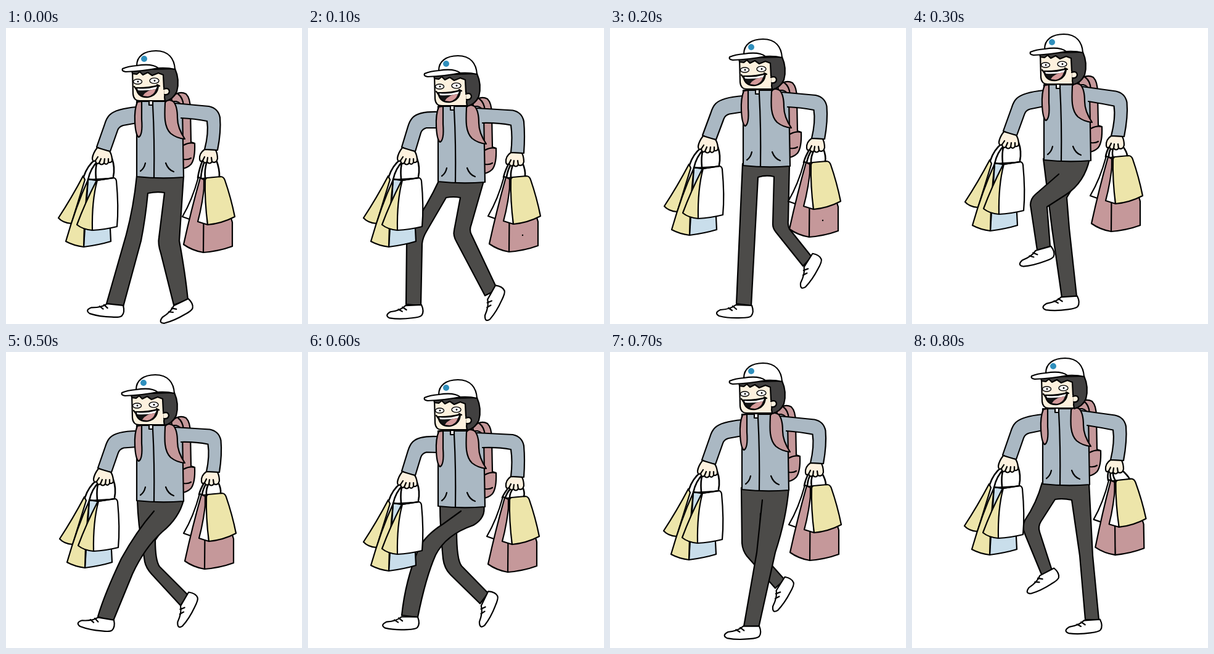
An HTML page that plays this animation: 480 px wide and 480 px high, repeating every 0.9 s.

```html
<!DOCTYPE html>
<html lang="en">
<head>
<meta charset="utf-8">
<title>Shopping walk</title>
<style>
html, body { margin: 0; width: 100%; height: 100%; overflow: hidden; background: #fff }
svg { display: block; width: 100%; height: 100% }
</style>
</head>
<body>
<svg id="stage" viewBox="0 0 480 480" stroke="#000" stroke-width="2.2" stroke-linejoin="round" stroke-linecap="round"></svg>
<script>
const WHITE = '#fff', CLOTH = '#aab8c3', PINK = '#c5989a', YELLOW = '#ede5aa',
      BLUE = '#c9deeb', DARK = '#4c4b49', HAIR = '#414040', SKIN = '#fdf1de';
const STEP = 100;

const path = (d, fill = 'none') => `<path d="${d}" fill="${fill}"/>`;
const group = (content, [x, y, angle = 0], pivot = '0 0') =>
  `<g transform="translate(${x} ${y}) rotate(${angle} ${pivot})">${content}</g>`;
const middle = (a, b) => [(a[0] + b[0]) / 2, (a[1] + b[1]) / 2];
// Formats coordinate pairs shifted by an offset.
const shift = (offset, ...coords) => coords.map((c, i) => c + offset[i % 2]).join(' ');

const head =
  path('M205 68L206 107Q207 118 217 118H258V70Z', SKIN) +
  path('M204 68L205 74L212 75L217 71L222 76L230 72L237 77L247 73L255 76L256 96Q259 104 257 112L258 119Q271 116 277 103Q282 84 274 66Z', HAIR) +
  path('M256 99Q264 96 265 103Q264 109 257 108', SKIN) +
  `<g stroke-width="1.4"><ellipse cx="213.5" cy="87" rx="7" ry="4" fill="#fff"/><ellipse cx="240.5" cy="85.5" rx="7.5" ry="4.4" fill="#fff"/></g>
   <g stroke="none"><circle cx="214" cy="87" r="1.4"/><circle cx="241" cy="85.5" r="1.4"/></g>` +
  path('M210 97Q228 98 247 93Q246 109 231 112Q214 114 211 97Z', '#151515') +
  `<g stroke="none">${path('M213 98Q229 100 245 95L243 99Q229 102 214 101Z', WHITE)}${path('M222 110Q228 100 243 99Q240 109 230 111Z', '#d49a9a')}</g>` +
  path('M208 95L211 99M245 92L249 94') +
  path('M212 61C212 46 224 37 243 37C264 37 273 50 274 67Q262 64 247 65Q222 70 194 71Q187 70 189 66Q198 62 212 61Z', WHITE) +
  path('M212 61Q237 57 247 65') +
  '<circle cx="224" cy="50" r="5" fill="#2f8fbd" stroke="none"/>';

const backpack =
  path('M268 112Q281 101 292 107Q299 114 299 132L300 185L306 187Q307 212 300 221Q294 227 286 228Z', PINK) +
  path('M279 107Q287 113 288 126M288 190Q298 185 305 187M288 213Q296 214 300 211');

const torso =
  path('M212 119H276Q284 121 286 130L288 242Q250 245 212 241Z', CLOTH) +
  path('M232 119V125H238V119', WHITE) +
  path('M238 125Q241 180 240 242M218 232Q224 228 226 219M259 219Q263 230 272 233');

const straps =
  path('M213 120Q208 132 209 152Q210 173 215 177Q222 174 220 148V119Z', PINK) +
  path('M258 121C257 142 256 160 267 171Q277 179 290 180Q278 162 278 146Q278 126 271 119Q262 114 258 121Z', PINK);

const leftBags =
  path('M125 240Q106 276 85 308Q92 316 106 317L128 246Z', YELLOW) +
  path('M133 246L165 244L170 346Q150 352 126 355Z', BLUE) +
  path('M133 246Q113 290 97 346Q110 353 126 355Q127 300 133 246Z', YELLOW) +
  path('M147 247Q128 284 115 319Q125 327 140 328L147 247Z', YELLOW) +
  path('M148 247L174 243Q178 243 179 248Q183 290 180 322Q160 327 140 328Q139 280 148 247Z', WHITE) +
  `<g stroke-width="2.6">${path('M145 213Q132 223 126 241M149 216Q137 227 133 246M146 245Q144 222 150 213M172 212Q177 226 174 241M133 245L147 247L174 243')}</g>`;

const leftHand =
  path('M148 194Q141 203 140 211Q140 218 145 215Q146 222 151 219Q155 224 159 219Q163 223 166 218Q173 219 172 212Q171 204 168 200Z', SKIN) +
  path('M145 215L149 209M151 219L154 212M159 219L160 212M166 218V212');

const rightBags = dot =>
  path('M312 242Q302 279 286 306L303 312L318 244Z', WHITE) +
  path('M317 244L345 242L367 315V354Q345 362 320 364Z', PINK) +
  path('M315 243Q300 296 288 351Q302 361 320 364L321 246Z', PINK) +
  path('M323 244Q319 285 311 314L327 319Z', WHITE) +
  path('M326 243L348 241Q353 241 355 247Q365 276 371 306Q350 317 327 319Q322 280 323 247Q323 244 326 243Z', YELLOW) +
  (dot ? '<circle cx="342" cy="337" r="1.2" stroke="none"/>' : '');

const rightHand =
  path('M322 197Q313 203 314 213Q315 218 319 215Q322 221 326 217Q330 222 334 217Q341 220 343 212Q343 204 340 198Z', SKIN) +
  path('M319 215L322 209M326 217L327 210M334 217L333 210');

const shoe =
  path('M-13 -1L13 0Q17 11 12 17Q9 20 -4 20Q-24 21 -40 17Q-49 12 -38 7Q-21 6 -13 -1Z', WHITE) +
  path('M-25 4L-19 8M-18 1L-12 6');

function leftArm(body, hand) {
  const elbow = middle(body, hand);
  return path(`M${shift(body, 212, 128)}Q${shift(elbow, 178, 131, 168, 141)}Q${shift(elbow, 163, 146, 160, 156)}` +
    `L${shift(hand, 147, 193)}Q${shift(hand, 158, 199, 169, 200)}L${shift(elbow, 181, 166)}` +
    `Q${shift(elbow, 183, 160, 190, 158)}L${shift(body, 212, 154)}`, CLOTH);
}
function rightArm(body, hand) {
  const elbow = middle(body, hand);
  return path(`M${shift(body, 274, 122)}L${shift(elbow, 329, 127)}Q${shift(elbow, 344, 130, 347, 145)}` +
    `Q${shift(elbow, 349, 168)} ${shift(hand, 343, 198)}L${shift(hand, 322, 197)}` +
    `Q${shift(elbow, 329, 170, 326, 151)}Q${shift(elbow, 306, 147)} ${shift(body, 284, 146)}`, CLOTH);
}
function rightHandles(hand, bags) {
  const cord = (x1, y1, x2, y2, bend) =>
    `M${shift(hand, x1, y1)}Q${shift(middle(hand, bags), (x1 + x2) / 2 + bend, 229)} ${shift(bags, x2, y2)}`;
  return `<g stroke-width="2.6">${path(cord(319, 214, 311, 243, -2) + cord(322, 216, 316, 243, -2) +
    cord(326, 216, 323, 244, -3) + cord(341, 214, 346, 241, 3))}</g>`;
}

// Offsets are relative to the first pose; shoes are [x, y, angle].
const poses = [
  { head: [0, 0], body: [0, 0], left: [0, 0], right: [0, 0], bags: [0, 0],
    legs: ['M212 240Q207 290 195 335L163 447L190 452L219 345Q226 310 230 268Q244 265 257 267L248 340Q246 350 251 365L272 449L295 441Q291 400 281 345L288 240Z'],
    shoes: [[177, 449, 4], [284, 445, -28]] },
  { head: [0, 8], body: [-1, 8], left: [5, 0], right: [7, 5], bags: [6, -1], dot: true,
    legs: ['M212 248Q195 285 166 328Q160 338 160 352L159 448L183 450L185 350Q186 340 192 330L224 275Q236 273 247 275L237 328Q235 337 241 347L287 434L307 424L265 335Q261 328 265 318L285 248Z'],
    shoes: [[171, 450, -5], [298, 429, -63]] },
  { head: [5, -19], body: [4, -18], left: [3, -19], right: [5, -18], bags: [3, -25], dot: true,
    legs: ['M215 220L205 447L229 450L240 242Q253 238 266 241L264 318Q264 325 269 331L313 386L327 371L291 326Q288 320 289 310L291 220Z'],
    shoes: [[217, 450, 0], [322, 377, -60]] },
  { head: [3, -27], body: [2, -27], left: [1, -26], right: [1, -22], bags: [3, -34],
    legs: ['M213 212L227 325L243 437L267 435L255 325L251 275L288 214Z',
      'M288 212Q280 250 250 270L219 290L224 354L203 360L192 287Q192 277 200 270L238 237'],
    shoes: [[255, 436, -6], [213, 358, -18]] },
  { head: [-2, -12], body: [0, -10], left: [0, -11], right: [0, -11], bags: [0, -20],
    legs: ['M212 229Q212 265 221 310L226 340Q228 350 237 360L285 413L297 394L251 349Q245 340 243 310L288 229Z',
      'M288 229Q276 262 249 298L168 441L148 424Q170 385 205 327Q230 285 236 264'],
    gap: 'M235 251Q240 249 244 252Q243 258 236 264Z',
    shoes: [[157, 431, 24], [291, 403, -56]] },
  { head: [-1, 0], body: [0, 0], left: [2, -5], right: [3, -3], bags: [2, -12],
    legs: ['M213 240Q214 280 222 320L225 340Q227 350 236 360L283 411L295 394L249 348Q242 338 242 305L288 240Z',
      'M288 240Q281 269 253 292Q225 317 205 360L173 438L149 429Q160 392 187 335Q212 290 240 258'],
    shoes: [[162, 433, 7], [290, 401, -62]] },
  { head: [0, 8], body: [-1, 9], left: [5, 0], right: [7, 5], bags: [4, -7],
    legs: ['M214 246Q214 285 219 335Q221 351 231 361L279 408L292 391L249 347Q241 337 241 290L285 250Z',
      'M285 248Q289 269 268 281Q224 296 207 329Q191 365 178 430L152 427Q158 370 179 320Q190 297 219 279L248 258'],
    shoes: [[165, 430, -1], [287, 400, -66]] },
  { head: [5, -19], body: [2, -18], left: [2, -18], right: [3, -17], bags: [4, -26],
    legs: ['M213 220L214 310Q215 322 222 331L268 383L283 369L242 323L244 262L290 222Z',
      'M290 220Q286 270 268 325L241 447L217 445L238 325L247 240'],
    shoes: [[229, 445, -3], [277, 376, -60]] },
  { head: [5, -27], body: [0, -27], left: [0, -26], right: [0, -22], bags: [7, -35, -1],
    legs: ['M211 212Q202 245 183 273Q178 283 183 295L211 363L227 354L207 292Q204 283 209 275L232 239Q245 237 259 240L272 330L281 434L303 434L293 330L287 212Z'],
    shoes: [[292, 435, -6], [219, 357, -30]] }
];

function draw(p) {
  return group(backpack, p.body) +
    p.legs.map(d => path(d, DARK)).join('') + (p.gap ? path(p.gap, WHITE) : '') +
    p.shoes.map(s => group(shoe, s)).join('') +
    group(torso, p.body) + leftArm(p.body, p.left) + rightArm(p.body, p.right) + group(straps, p.body) +
    group(leftBags + leftHand, p.left) +
    group(rightBags(p.dot), p.bags, '325 220') + rightHandles(p.right, p.bags) + group(rightHand, p.right) +
    group(head, p.head);
}

const stage = document.getElementById('stage');
const start = performance.now();
let shown = -1;
function tick() {
  const index = Math.floor((performance.now() - start) / STEP) % poses.length;
  if (index !== shown) stage.innerHTML = draw(poses[shown = index]);
  requestAnimationFrame(tick);
}
tick();
</script>
</body>
</html>
```
